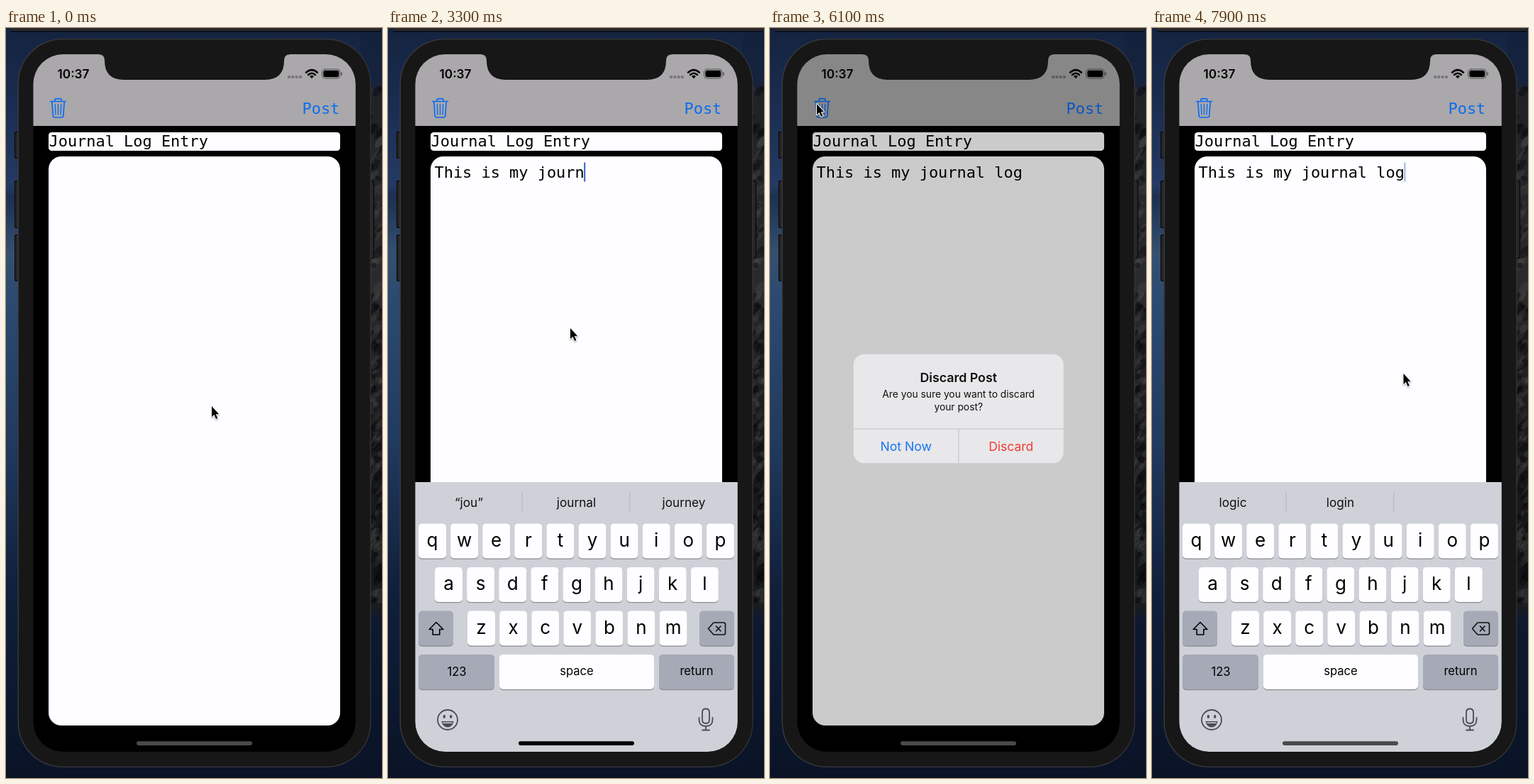
Animation, 530 px wide and 1057 px high, one loop 8 s. Source, as an HTML page with a canvas:

```html
<!DOCTYPE html>
<html lang="en">
<head>
<meta charset="utf-8">
<title>Journal entry</title>
<style>
html, body { margin: 0; width: 100%; height: 100%; overflow: hidden; background: #0b1428; }
canvas { display: block; width: 530px; height: 1057px; }
</style>
</head>
<body>
<canvas id="stage" width="530" height="1057"></canvas>
<script>
const c = document.getElementById('stage').getContext('2d');
const SANS = 'Inter, "Open Sans", sans-serif';
const MONO = '21.93px "DejaVu Sans Mono", monospace';
const ADVANCE = 13.2, LOOP = 8000, BLUE = '#0a6cf0';
const ENTRY = 'This is my journal log';
const BURSTS = [[1300, 150, 5], [2050, 120, 3], [2600, 90, 14]]; // start, gap, keystrokes
const KEYS = KEYTIMES();
const KB_IN = 917, KB_OUT = 4900, KB_BACK = 6963;
const ALERT_IN = 5111, ALERT_OUT = 6980;

// time, x, y of the pointer tip
const POINTER = [
  [0, 290, 533], [150, 290, 533], [800, 257, 423], [4150, 257, 423], [4500, 81, 97],
  [4750, 66, 107], [6199, 66, 107], [6200, 221, 585], [7200, 221, 585], [7850, 354.5, 487]
];
// letters typed, suggestions
const HINTS = [
  [0, 'I', 'The', 'I’m'], [1, '“T”', 'The', 'This'], [4, '', 'The', ''],
  [5, 'is', 'app', 'game'], [7, '“is”', 'isn’t', 'issue'], [8, 'a', 'the', 'my'],
  [10, '“my”', 'myself', 'mystery'], [11, 'own', 'first', 'name'],
  [14, '“jou”', 'journal', 'journey'], [18, '“journal”', 'journals', 'journalist'],
  [19, 'entry', 'and', 'for'], [22, '“log”', 'logic', 'login']
];

function KEYTIMES() {
  return BURSTS.flatMap(([start, gap, n]) => Array.from({ length: n }, (_, i) => start + i * gap));
}
const clamp = v => Math.max(0, Math.min(1, v));
const ramp = (t, a, b) => clamp((t - a) / (b - a));
const smooth = p => p * p * (3 - 2 * p);
function spring(t, start) {
  const x = Math.max(0, t - start) * 0.018;
  const p = 1 - (1 + x) * Math.exp(-x);
  return p > 0.99 ? 1 : p;
}

function box(x, y, w, h, r, fill) {
  c.beginPath();
  c.roundRect(x, y, w, h, r);
  c.fillStyle = fill;
  c.fill();
}
function text(s, x, y, font, fill, align = 'center') {
  c.font = font;
  c.textAlign = align;
  c.fillStyle = fill;
  c.fillText(s, x, y);
}
function line(d, color, width) {
  c.strokeStyle = color;
  c.lineWidth = width;
  c.stroke(new Path2D(d));
}
function shape(d, fill) {
  c.fillStyle = fill;
  c.fill(new Path2D(d));
}
function shade(y0, y1, stops) {
  const g = c.createLinearGradient(0, y0, 0, y1);
  stops.forEach(([at, color]) => g.addColorStop(at, color));
  return g;
}

function wallpaper() {
  c.fillStyle = shade(0, 1057, [[0, '#14233f'], [.1, '#1a2c50'], [.21, '#253a63'], [.225, '#1d3050'],
    [.3, '#35506f'], [.36, '#2c4a70'], [.55, '#213a5f'], [.75, '#101f3b'], [1, '#0a1326']]);
  c.fillRect(0, 0, 530, 1057);
  c.fillStyle = shade(0, 1057, [[0, '#14213d'], [.07, '#16233f'], [.09, '#202226'], [.35, '#2b2a2c'],
    [.5, '#1d1d20'], [.7, '#161719'], [.77, '#1b1c20'], [.79, '#0e1930'], [1, '#0a1326']]);
  c.fillRect(500, 0, 30, 1057);
  let seed = 7;
  const rnd = () => (seed = seed * 16807 % 2147483647) / 2147483647;
  for (let i = 0; i < 150; i++) {
    const x = 512 + rnd() * 18, y = 85 + rnd() * 725;
    c.fillStyle = rnd() < .55 ? 'rgba(8,8,10,.4)' : 'rgba(85,83,82,.25)';
    c.beginPath();
    c.ellipse(x, y, 2 + rnd() * 4, 3 + rnd() * 9, .6, 0, 7);
    c.fill();
  }
  box(7, -8, 521, 12, 4, '#29292b');
  c.fillStyle = '#070b15';
  c.fillRect(7, 4, 521, 1.5);
}

function phoneBody() {
  for (const [x, y, h] of [[12, 146, 38], [12, 215, 67], [12, 291, 66], [510, 215, 110]]) {
    box(x, y, 9, h, 2, '#050507');
    box(x + 1, y + 1, 7, h - 2, 2, '#252527');
  }
  box(16.5, 15, 498, 1027, 63, '#39393b');
  box(18, 16.2, 495.4, 1024.6, 62, '#171718');
}

function statusBar() {
  text('10:37', 95, 70.5, '600 17.2px ' + SANS, '#000');
  for (let i = 0; i < 4; i++) box(397 + i * 5.3, 67, 4, 4, 1.2, '#79787a');
  line('M423 62.7Q431 55.6 439 62.7M426 66Q431 61.6 436 66', '#000', 2.5);
  shape('M428 68Q431 65.6 434 68L431 71.3Z', '#000');
  c.beginPath();
  c.roundRect(445.5, 58, 25.5, 13, 4);
  c.strokeStyle = '#555456';
  c.lineWidth = 1;
  c.stroke();
  box(447.3, 59.8, 22, 9.4, 2.4, '#000');
  box(472.2, 62.3, 1.6, 4.4, 1, '#555456');
}

function trash(alpha) {
  c.globalAlpha = alpha;
  line('M62.5 103.5H84.5M69 103V101Q69 99.6 70.5 99.6H76.5Q78 99.6 78 101V103' +
    'M64.8 104L66.2 123.5Q66.4 126 69 126H78Q80.6 126 80.8 123.5L82.2 104', BLUE, 1.7);
  line('M69.3 107.5L69.9 122M73.5 107.5V122M77.7 107.5L77.1 122', BLUE, 1.4);
  c.globalAlpha = 1;
}

function page(t, n) {
  c.fillStyle = '#000';
  c.fillRect(38, 37, 455, 984);
  c.fillStyle = '#aaa8aa';
  c.fillRect(38, 37, 455, 101);
  statusBar();
  trash(t > 4850 ? .5 + .5 * ramp(t, 5350, 5650) : 1);
  text('Post', 417.5, 120.5, MONO, BLUE, 'left');
  box(60, 147, 411, 26, 4.5, '#fefdff');
  text('Journal Log Entry', 60.5, 167.3, MONO, '#000', 'left');
  box(60, 181, 411, 802, 18, '#fefdff');
  text(ENTRY.slice(0, n), 65.5, 211, MONO, '#000', 'left');
}

function caret(t, n) {
  const focused = t >= 1000 && t < KB_OUT || t >= KB_BACK;
  if (!focused) return;
  const since = t >= KB_BACK ? t - KB_BACK : t - (n ? KEYS[n - 1] : 1000);
  const phase = since % 1000;
  c.globalAlpha = Math.max(1 - ramp(phase, 500, 700), ramp(phase, 880, 1000));
  c.fillStyle = '#3460cc';
  c.fillRect(65 + n * ADVANCE, 189.5, 2, 27);
  c.globalAlpha = 1;
}

function key(x, y, w, fill) {
  box(x, y + 1.2, w, 49, 5, '#8a8c92');
  box(x, y, w, 49, 5, fill);
}

function hints(t, n) {
  const write = (row, alpha) => {
    c.globalAlpha = alpha;
    row.forEach((s, i) => text(s, 114 + i * 151.5, 34.5, `17.2px ${SANS}`, '#111'));
    c.globalAlpha = 1;
  };
  if (t > KB_OUT + 500) return write(['logic', 'login', ''], .2 + .8 * ramp(t, 7000, 7250));
  const i = HINTS.findLastIndex(h => h[0] <= n);
  const p = i ? ramp(t, KEYS[HINTS[i][0] - 1], KEYS[HINTS[i][0] - 1] + 200) : 1;
  if (p < 1) write(HINTS[i - 1].slice(1), 1 - p);
  write(HINTS[i].slice(1), p);
}

function keyboard(t, n, top) {
  const WHITE = '#fefdff', GREY = '#a6aab6', upper = n === 0;
  c.save();
  c.translate(0, top);
  c.fillStyle = '#ced1d8';
  c.fillRect(38, 0, 455, 400);
  c.fillStyle = '#b2b5bc';
  c.fillRect(188.6, 14, 1, 28);
  c.fillRect(340.2, 14, 1, 28);
  hints(t, n);
  [['qwertyuiop', 43, 58.5], ['asdfghjkl', 66, 120], ['zxcvbnm', 112, 181.5]].forEach(([row, x, y]) =>
    [...row].forEach((ch, i) => {
      const kx = x + i * 45.1;
      key(kx, y, 39, WHITE);
      text(upper ? ch.toUpperCase() : ch, kx + 19.5, y + (upper ? 33.3 : 32),
        `${upper ? 24 : 26}px ${SANS}`, '#000');
    }));
  key(43, 181.5, 49, upper ? WHITE : GREY);
  key(439, 181.5, 49, GREY);
  key(43, 243, 107, GREY);
  key(157, 243, 218, WHITE);
  key(382, 243, 106, GREY);
  const small = `16.6px ${SANS}`;
  text('123', 97, 273, small, '#000');
  text('space', 266, 272, small, '#000');
  text('return', 435, 272, small, '#000');

  c.lineJoin = c.lineCap = 'round';
  const arrow = 'M68 197.5L77.8 207.5H72.8V215H63.2V207.5H58.2Z';
  if (upper) shape(arrow, '#000');
  line(arrow, '#000', 1.6);
  line('M459 198H473Q475.5 198 475.5 200.5V212.5Q475.5 215 473 215H459L451.5 206.5Z' +
    'M462.5 203L469 210M469 203L462.5 210', '#111', 1.6);

  const ink = '#4b4d53';
  line('M98 335A14 14 0 1 1 70 335A14 14 0 1 1 98 335', ink, 1.8);
  shape('M75.5 337H92.5Q91 345.5 84 345.5Q77 345.5 75.5 337Z', ink);
  line('M78 339.3H90', '#ced1d8', 1.6);
  for (const x of [79.3, 88.7]) {
    c.fillStyle = ink;
    c.beginPath();
    c.ellipse(x, 330.5, 1.7, 2.4, 0, 0, 7);
    c.fill();
  }
  line('M448 319.5Q453 319.5 453 324.5V335Q453 340 448 340Q443 340 443 335V324.5Q443 319.5 448 319.5Z' +
    'M438.5 332V335Q438.5 344 448 344Q457.5 344 457.5 335V332M448 344V349.5M443 349.5H453', ink, 1.8);
  c.restore();
}

function alertBox(show, scale) {
  c.save();
  c.globalAlpha = show;
  c.translate(265.7, 536.5);
  c.scale(scale, scale);
  box(-148, -76.8, 296, 153.6, 15, '#e8e7e9');
  c.fillStyle = '#c3c2c6';
  c.fillRect(-148, 28, 296, 1);
  c.fillRect(-.3, 28, 1, 48.8);
  text('Discard Post', 0, -37.6, `600 17.8px ${SANS}`, '#111');
  text('Are you sure you want to discard', 0, -15.6, `13.8px ${SANS}`, '#111');
  text('your post?', 0, 2, `13.8px ${SANS}`, '#111');
  text('Not Now', -74, 59.8, `17.6px ${SANS}`, '#1476f2');
  text('Discard', 74, 59.8, `17.5px ${SANS}`, '#f23b35');
  c.restore();
}

function notch() {
  shape('M131 36V37.3Q139 37.3 139 46Q139 73 166 73H365Q392 73 392 46Q392 37.3 400 37.3V36Z', '#171718');
}

function pointer(t) {
  const i = Math.max(1, POINTER.findIndex(p => p[0] > t));
  const end = t >= POINTER.at(-1)[0];
  const [t0, x0, y0] = end ? POINTER.at(-1) : POINTER[i - 1];
  const [t1, x1, y1] = end ? POINTER.at(-1) : POINTER[i];
  const p = end || t1 - t0 < 2 ? 0 : smooth(ramp(t, t0, t1));
  c.save();
  c.translate(x0 + (x1 - x0) * p, y0 + (y1 - y0) * p);
  c.shadowColor = 'rgba(0,0,0,.35)';
  c.shadowBlur = 2;
  c.shadowOffsetY = 1;
  const arrow = 'M0 0V15.2L3.4 12L6 18L8.4 17L5.8 11.2H10.2Z';
  line(arrow, '#fff', 2);
  c.shadowColor = 'transparent';
  shape(arrow, '#000');
  c.restore();
}

function draw(now) {
  const t = now % LOOP;
  const n = KEYS.filter(k => k <= t).length;
  const kb = t < KB_OUT ? spring(t, KB_IN) : t < KB_BACK ? 1 - spring(t, KB_OUT) : spring(t, KB_BACK);
  const opened = spring(t, ALERT_IN), show = opened * (1 - spring(t, ALERT_OUT));

  c.lineJoin = c.lineCap = 'round';
  wallpaper();
  phoneBody();
  c.save();
  c.beginPath();
  c.roundRect(38.4, 37, 454.4, 983, 42);
  c.clip();
  page(t, n);
  caret(t, n);
  c.fillStyle = `rgba(0,0,0,${.2 * show})`;
  c.fillRect(38, 37, 455, 984);
  if (kb > 0) keyboard(t, n, 1020 - 380 * kb);
  if (show > 0) alertBox(show, 1.33 - .33 * opened);
  box(184, 1005.3, 163, 5.6, 2.8, t > 1050 && t < 5100 ? '#000' : '#4a4a4c');
  c.restore();
  notch();
  pointer(t);
  requestAnimationFrame(draw);
}
requestAnimationFrame(draw);
</script>
</body>
</html>
```
